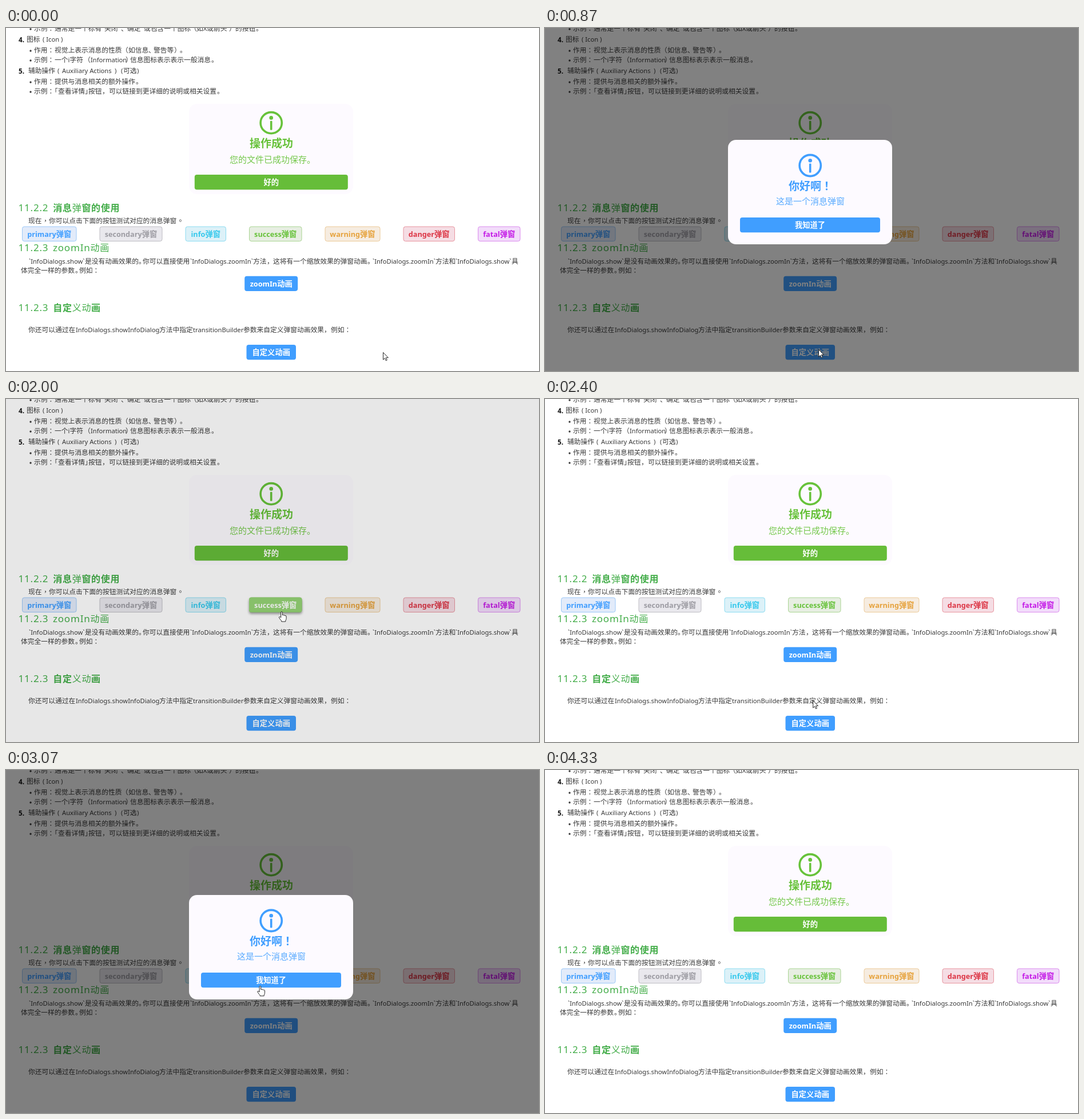
Animation, 932 px wide and 601 px high, one loop 4.87 s. Source, as an HTML page:

```html
<!DOCTYPE html>
<html lang="zh-CN">
<head>
<meta charset="utf-8">
<title>InfoDialogs</title>
<style>
html, body { margin: 0; width: 100%; height: 100%; overflow: hidden; background: #fff; }
svg { display: block; width: 932px; height: 601px; cursor: default; }
text { font-family: "Noto Sans", "Noto Sans CJK SC", sans-serif; text-spacing-trim: space-all; }
.cjk { font-family: "Noto Sans CJK SC", "Noto Sans CJK", sans-serif; }
.mid { font-family: "Noto Sans CJK TC", "Noto Sans CJK", sans-serif; }
</style>
</head>
<body>
<svg id="stage" viewBox="0 0 932 601" xmlns="http://www.w3.org/2000/svg">
  <defs><filter id="soft" x="-10%" y="-50%" width="120%" height="200%"><feGaussianBlur stdDeviation="2"/></filter></defs>
</svg>
<script>
const NS = "http://www.w3.org/2000/svg";
const stage = document.getElementById("stage");
const LOOP = 4870, TICK = 200 / 3;
const BLUE = "#409eff", GREEN = "#67c23a", HEAD = "#43ad49", INK = "#3a3a3a", PANEL = "#fdfaff";

function add(parent, tag, attrs = {}) {
  const el = document.createElementNS(NS, tag);
  for (const k in attrs) el.setAttribute(k, attrs[k]);
  parent.appendChild(el);
  return el;
}
const group = (parent, attrs) => add(parent, "g", attrs);

// Latin runs are set a little smaller or larger than the Chinese ones; y is the line's middle.
// Colons and exclamation marks stand in the middle of their cell.
function label(parent, x, y, str, size, o = {}) {
  const el = add(parent, "text", {
    x, y: y + size * 0.37, "font-size": size, fill: o.fill || INK,
    "font-weight": o.weight || 400, "text-anchor": o.anchor || "start"
  });
  for (const run of str.match(/[\x20-\x7e]+|[：！]|[^\x20-\x7e：！]+/g)) {
    const latin = run.charCodeAt(0) < 127, mid = o.mid || /[：！]/.test(run);
    const span = add(el, "tspan", latin
      ? { "font-size": size * (o.ratio || 0.953), "letter-spacing": o.gap || 0 }
      : { class: mid ? "mid" : "cjk", lang: mid ? "zh-TW" : "zh-CN", "letter-spacing": o.cjkGap || 0 });
    span.textContent = run;
  }
  return el;
}

function box(parent, x, y, w, h, r, fill, stroke) {
  return add(parent, "rect", { x, y, width: w, height: h, rx: r, fill, stroke: stroke || "none" });
}

function shadow(parent, x, y, w, h) {
  const el = box(parent, x, y + 3, w, h, 4, "#000");
  el.setAttribute("filter", "url(#soft)");
  return el;
}

function button(parent, x, y, w, text, fill, ink = "#fff", stroke) {
  if (stroke) box(parent, x + 0.5, y + 0.5, w - 1, 25.4, 3.5, fill, stroke);
  else box(parent, x, y, w, 26.2, 4, fill);
  label(parent, x + w / 2, y + 13.2, text, 13.3, { fill: ink, weight: 600, anchor: "middle" });
}

function infoIcon(parent, cy, color) {
  add(parent, "circle", { cx: 463.7, cy, r: 18.6, fill: "none", stroke: color, "stroke-width": 3.6 });
  add(parent, "circle", { cx: 463.7, cy: cy - 8.8, r: 3.3, fill: color });
  box(parent, 461.9, cy - 3.5, 3.6, 16, 1, color);
}

const page = group(stage);

// Each line: middle y, then x and text of its pieces.
const lines = [
  [1, 49, "示例：", 85, "通常是一个标有", 167, "\"", 172, "关闭", 196, "\"", 201, "、", 208, "\"", 212, "确定", 236, "\"", 241, "或包含一个图标",
    322, "（", 333, "如X或前头", 390, "）", 401, "的按钮", 437, "。"],
  [20, 36, "图标", 64, "( Icon )"],
  [39, 49, "作用：", 85, "视觉上表示消息的性质", 202, "（", 214, "如信息", 249, "、", 258, "警告等", 294, "）", 304, "。"],
  [56, 49, "示例：", 85, "一个i字符", 136, "（", 148, "Information", 209, "）", 217, "信息图标表示表示一般消息", 359, "。"],
  [75, 39, "辅助操作", 90, "(", 98, "Auxiliary Actions", 190, ")", 201, "(", 205, "可选", 229, ")"],
  [94, 49, "作用：", 85, "提供与消息相关的额外操作", 227, "。"],
  [111, 49, "示例：", 79, "「", 91, "查看详情", 138, "」", 144, "按钮", 168, "，", 180, "可以链接到更详细的说明或相关设置", 369, "。"],
  [338, 39, "现在", 75, "你可以点击下面的按钮测试对应的消息弹窗"],
  [409, 40, "`InfoDialogs.show`", 138, "是没有动画效果的", 232, "。", 239, "你可以直接使用", 322, "`InfoDialogs.zoomIn`",
    432, "方法", 456, "，", 467, "这将有一个缩放效果的弹窗动画", 632, "。", 641, "`InfoDialogs.zoomIn`", 751, "方法和",
    786, "`InfoDialogs.show`", 884, "具"],
  [425, 26, "体完全一样的参数", 121, "。", 128, "例如："],
  [529, 39, "你还可以通过在", 122, "InfoDialogs.showInfoDialog", 268, "方法中指定", 327, "transitionBuilder",
    415, "参数来自定义弹窗动画效果", 556, "，", 568, "例如："]
];
for (const [y, ...parts] of lines)
  for (let i = 0; i < parts.length; i += 2) label(page, parts[i], y, parts[i + 1], 11.75);
label(page, 63, 338, "，", 11.75, { mid: true });
label(page, 299, 338, "。", 11.75, { mid: true });
for (const y of [1, 39, 56, 94, 111]) add(page, "circle", { cx: 43, cy: y + 1, r: 1.7, fill: INK });
label(page, 22, 20, "4.", 12.3, { weight: 700, fill: "#111" });
label(page, 22, 75, "5.", 12.3, { weight: 700, fill: "#111" });

function heading(y, num, ...parts) {
  const o = { fill: HEAD, ratio: 1.0625, gap: 0.8, cjkGap: 0.7 };
  label(page, 21.5, y, num, 16, o);
  for (const [x, str, weight] of parts) label(page, x, y, str, 16, { ...o, weight });
}
heading(315.5, "11.2.2", [82.3, "消息", 700], [115.7, "弹", 400], [132.4, "窗的使用", 700]);
heading(385, "11.2.3", [82, "zoomIn动画", 400]);
heading(490, "11.2.3", [82.3, "自定", 700], [115.7, "义动", 400], [149.1, "画", 700]);

// Result card
box(page, 320, 133, 287, 158, 14, PANEL);
infoIcon(page, 166.2, GREEN);
label(page, 464, 202, "操作成功", 19, { fill: GREEN, weight: 700, anchor: "middle" });
label(page, 391, 230, "您的文件已成功保存。", 15, { fill: "#75c84c", weight: 300 });
button(page, 329.8, 257, 268, "好的", "#66bd39");

// Plain buttons: name, x, width, ink, fill, border
const kinds = [
  ["primary", 28, 95.5, BLUE, "#e2ebfa", "#9cc8f8"],
  ["secondary", 163.5, 110, "#9d9ca3", "#e9e8ed", "#bebdc3"],
  ["info", 313.5, 71.5, "#35c8ec", "#dcf1f8", "#8bdcf1"],
  ["success", 425, 92.5, GREEN, "#e7eee2", "#a9d592"],
  ["warning", 557.5, 97, "#e6a23c", "#f6ece0", "#ecca98"],
  ["danger", 694.5, 90.5, "#dc3545", "#f5dde4", "#e8959f"],
  ["fatal", 825, 74.5, "#c41be6", "#f2dcfa", "#dc8cee"]
];
const ROW = 347.6;
let successHot;
for (const [name, x, w, ink, fill, edge] of kinds) {
  const text = name + "弹窗";
  button(page, x, ROW, w, text, fill, ink, edge);
  if (name === "success") {
    successHot = group(page);
    shadow(successHot, x, ROW, w, 26).setAttribute("opacity", 0.4);
    button(successHot, x, ROW, w, text, "#95d475");
  }
}
button(page, 417.2, 434.7, 93, "zoomIn动画", BLUE);
const customShade = shadow(page, 420.5, 555, 86.5, 26);
button(page, 420.5, 555, 86.5, "自定义动画", BLUE);

const barrier = box(stage, 0, 0, 932, 601, 0, "#000");

const dialog = group(stage);
box(dialog, 320, 219, 287, 183, 14, PANEL);
infoIcon(dialog, 264, BLUE);
label(dialog, 464, 299.5, "你好啊！", 19, { fill: BLUE, weight: 700, anchor: "middle" });
label(dialog, 464, 326.5, "这是一个消息弹窗", 15, { fill: "#5aabff", weight: 300, anchor: "middle" });
const okShade = shadow(dialog, 341, 355, 245, 26);
button(dialog, 341, 355, 245, "我知道了", BLUE);

const cursor = group(stage, { fill: "#fff", stroke: "#111", "stroke-width": 0.9, "stroke-linejoin": "round" });
const arrow = add(cursor, "path", { d: "M.5.5V13.2L3.4 10.5 5.3 14.8 7.3 13.9 5.4 9.7H9.4Z" });
const hand = add(cursor, "path", {
  d: "M-1.3 1Q-1.3-.3 0-.3T1.3 1V5.6Q2.6 4.7 3.8 6 5 5.3 6 6.6 7.9 6 8.1 8V11.5Q8.1 13.6 6.8 15.2V17H-.3V15.6Q-2.2 13.8-4.4 10.2-5 8.7-3.7 8.5-2.6 8.4-1.3 10.1Z"
});

const clamp = v => Math.max(0, Math.min(1, v));

function bezier(x1, y1, x2, y2) {
  const at = (a, b, s) => 3 * a * s * (1 - s) ** 2 + 3 * b * s * s * (1 - s) + s ** 3;
  return x => {
    let lo = 0, hi = 1;
    for (let i = 0; i < 24; i++) {
      const m = (lo + hi) / 2;
      if (at(x1, x2, m) < x) lo = m; else hi = m;
    }
    return at(y1, y2, (lo + hi) / 2);
  };
}
const ease = bezier(0.25, 0.1, 0.25, 1);
const easeInOut = bezier(0.42, 0, 0.58, 1);

const pulse = (t, on, off, d) => clamp((t - on) / d) - clamp((t - off) / d);
const shown = t => pulse(t, 522, 1660, 400) + pulse(t, 2638, 3617.5, 400);

// Pointer stops: time, x, y
const path = [
  [0, 659, 568], [470, 478, 563], [940, 478, 563], [1070, 479, 528], [1500, 482, 373], [2140, 482, 373],
  [2500, 465, 564], [2660, 465, 564], [2733, 463.5, 555], [3130, 443, 366], [3830, 443, 366],
  [4067, 134, 552], [4330, 94, 602]
];
function pointer(t) {
  let i = 0;
  while (i < path.length - 2 && t >= path[i + 1][0]) i++;
  const [a, ax, ay] = path[i], [b, bx, by] = path[i + 1];
  const u = clamp((t - a) / (b - a)), s = u * u * (3 - 2 * u);
  return [ax + (bx - ax) * s, ay + (by - ay) * s];
}
const inside = (x, y, l, r, top) => x >= l && x <= r && y >= top && y <= top + 26;

function isHand(t, x, y) {
  const modal = (t > 680 && t < 1660) || (t > 2680 && t < 3616);
  if (modal) return inside(x, y, 341, 586, 355);
  return inside(x, y, 420, 507, 555) || inside(x, y, 425, 518, 348) || inside(x, y, 417, 510, 435);
}

function draw(t) {
  const c = shown(t);
  barrier.setAttribute("opacity", 0.5 * ease(c));
  dialog.setAttribute("transform", `translate(0 ${(easeInOut(c) - 1) * 601})`);
  dialog.setAttribute("visibility", c > 0 ? "visible" : "hidden");
  customShade.setAttribute("opacity", 0.3 * (pulse(t, 330, 720, 150) + pulse(t, 2400, 2780, 150)));
  okShade.setAttribute("opacity", 0.35 * (pulse(t, 1390, 1650, 150) + pulse(t, 3110, 3600, 150)));
  successHot.setAttribute("opacity", pulse(t, 1670, 2160, 160) + pulse(t, 3620, 3850, 160));
  const [x, y] = pointer(t), over = isHand(t, x, y);
  cursor.setAttribute("transform", `translate(${x} ${y})`);
  cursor.setAttribute("visibility", t < 4320 ? "visible" : "hidden");
  arrow.setAttribute("display", over ? "none" : "inline");
  hand.setAttribute("display", over ? "inline" : "none");
}

// Motion advances 15 times per second.
function loop() {
  const t = performance.now() % LOOP;
  draw(Math.floor((t + 3.4) / TICK) * TICK);
  requestAnimationFrame(loop);
}
loop();
</script>
</body>
</html>
```
